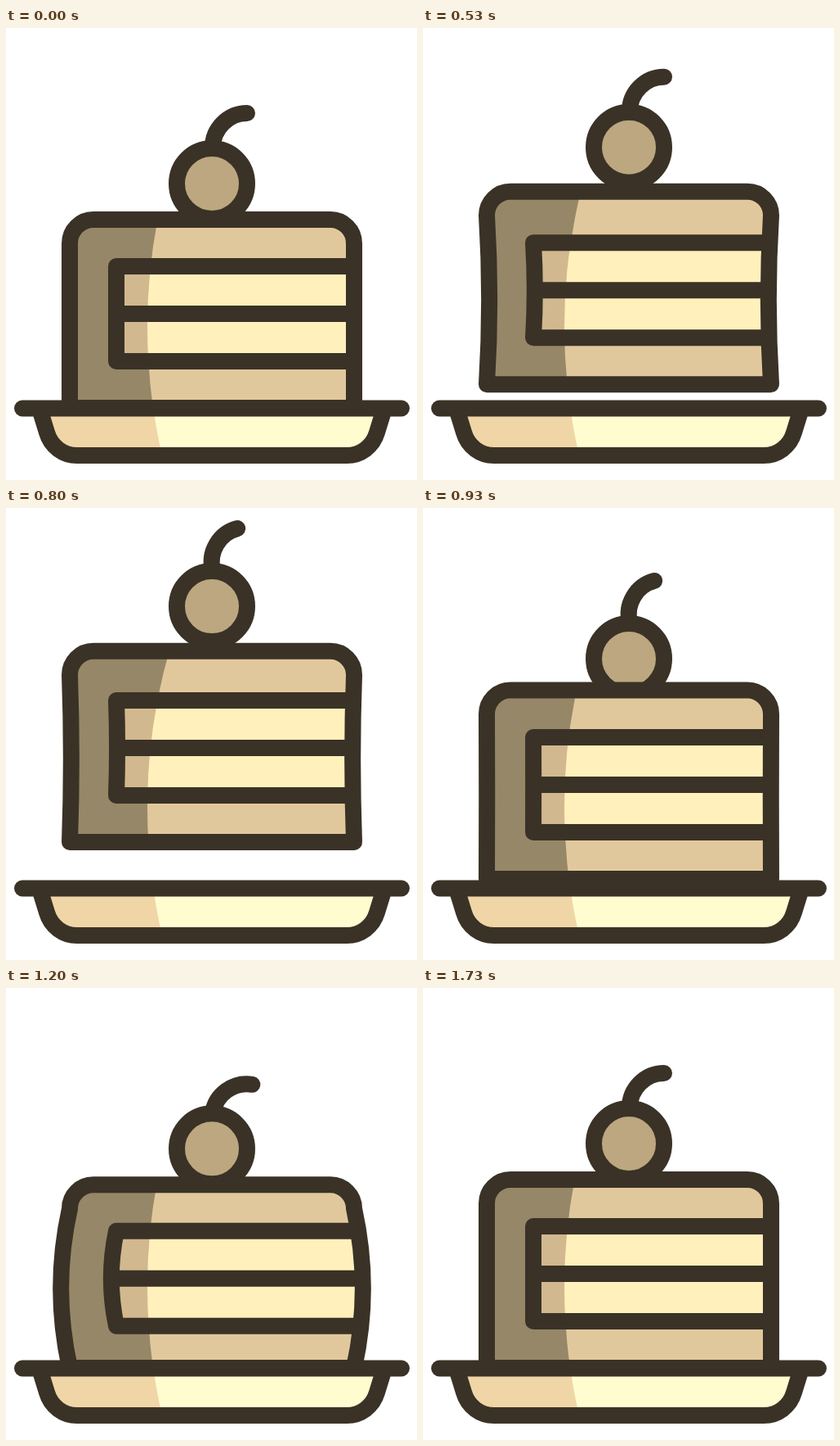
Write an HTML page with a canvas that moves like this. It is 503 by 552 pixels and loops after 1.87 s.

```html
<!DOCTYPE html>
<html lang="en">
<head>
<meta charset="utf-8">
<title>Jumping cake</title>
<style>
  html, body { margin: 0; width: 100%; height: 100%; overflow: hidden; background: #fff; }
  canvas { display: block; width: 503px; height: 552px; }
</style>
</head>
<body>
<canvas id="stage" width="503" height="552"></canvas>
<script>
const ctx = document.getElementById('stage').getContext('2d');
const LOOP = 1870, STEP = 200 / 3, LAST_STEP = 26;
const FLOOR = 464, LEFT = 78, RIGHT = 426, RADIUS = 29;
const INK = '#3a3226';

// Ballistic arc: highest at `peak`, on the ground outside peak ± half.
const hop = (t, peak, half, rise) => Math.max(0, rise * (1 - ((t - peak) / half) ** 2));

// Smooth bump from 0 to 1 and back.
const bump = (t, peak, half) =>
  Math.abs(t - peak) < half ? Math.cos(Math.PI / 2 * (t - peak) / half) ** 2 : 0;

// Pulled long right after take-off, relaxed on landing.
function stretchAt(t, from, to) {
  const p = (t - from) / (to - from);
  return p > 0 && p < 1 ? Math.sin(Math.PI * Math.sqrt(p)) : 0;
}

function poseAt(t) {
  const squash = bump(t, 350, 130) + bump(t, 1130, 170);
  const stretch = stretchAt(t, 471, 955);
  const bottom = FLOOR - hop(t, 713, 242, 64.3) - hop(t, 1380, 95, 7);
  return {
    bottom,
    top: bottom - 230 + 10 * squash - 6 * stretch,
    mid: bottom - 115 + 9 * squash,
    bulge: 17 * squash - 3.5 * stretch,
    cherry: 190 + 10 * squash - hop(t, 700, 242, 84.3) - hop(t, 1390, 120, 14),
    tilt: 10 * bump(t, 1230, 200) - 17 * bump(t, 867, 260)
  };
}

function stroke(path) {
  ctx.strokeStyle = INK;
  ctx.stroke(path);
}

// The light falls inside one large circle that stays still on the stage.
function fillLit(path, dark, light) {
  ctx.save();
  ctx.clip(path);
  ctx.fillStyle = dark;
  ctx.fillRect(0, 0, 503, 552);
  ctx.fillStyle = light;
  ctx.beginPath();
  ctx.arc(863, 365, 690, 0, 2 * Math.PI);
  ctx.fill();
  ctx.restore();
}

function drawCherry({ cherry, tilt }) {
  ctx.save();
  ctx.translate(253, cherry - 44);
  ctx.rotate(tilt * Math.PI / 180);
  ctx.lineCap = 'round';
  stroke(new Path2D('M0 0C0 -23 19 -42 42 -42'));
  ctx.restore();
  const ball = new Path2D();
  ball.arc(252, cherry, 43, 0, 2 * Math.PI);
  ctx.fillStyle = '#bca780';
  ctx.fill(ball);
  stroke(ball);
}

function drawCake({ top, bottom, mid, bulge }) {
  const shoulder = top + RADIUS, belly = (shoulder + bottom) / 2;
  const body = new Path2D();
  body.moveTo(LEFT, bottom);
  body.quadraticCurveTo(LEFT - 2 * bulge, belly, LEFT, shoulder);
  body.arcTo(LEFT, top, LEFT + RADIUS, top, RADIUS);
  body.lineTo(RIGHT - RADIUS, top);
  body.arcTo(RIGHT, top, RIGHT, shoulder, RADIUS);
  body.quadraticCurveTo(RIGHT + 2 * bulge, belly, RIGHT, bottom);
  body.closePath();
  fillLit(body, '#968768', '#e1c89c');

  const edge = y => {
    const s = (y - shoulder) / (bottom - shoulder);
    return RIGHT + 4 * bulge * s * (1 - s);
  };
  const upper = mid - 58, lower = mid + 58, inset = bulge * 0.57;
  const layers = new Path2D();
  layers.moveTo(edge(upper), upper);
  layers.lineTo(135, upper);
  layers.quadraticCurveTo(135 - 2 * inset, mid, 135, lower);
  layers.lineTo(edge(lower), lower);
  fillLit(layers, '#d2b88f', '#fff0bc');
  layers.moveTo(135 - inset, mid);
  layers.lineTo(edge(mid), mid);
  ctx.lineCap = 'butt';
  stroke(layers);
  stroke(body);
}

const bowl = new Path2D('M42 468L50 494C55 511 70 522 87 522H417C434 522 449 511 454 494L462 468');
const rim = new Path2D('M20 464.5H484');

function drawPlate() {
  fillLit(bowl, '#f0d5a7', '#fffdd0');
  ctx.lineCap = 'round';
  stroke(bowl);
  stroke(rim);
}

// Three steps every 200 ms, on a clock of 10 ms ticks.
function stepAt(t) {
  const r = t % 200;
  return Math.floor(t / 200) * 3 + (r >= 70) + (r >= 130);
}

function draw(t) {
  const pose = poseAt(Math.min(stepAt(t), LAST_STEP) * STEP);
  ctx.clearRect(0, 0, 503, 552);
  ctx.lineWidth = 20;
  ctx.lineJoin = 'round';
  drawCherry(pose);
  drawCake(pose);
  drawPlate();
}

const start = performance.now();
function tick() {
  draw((performance.now() - start) % LOOP);
  requestAnimationFrame(tick);
}
tick();
</script>
</body>
</html>
```
